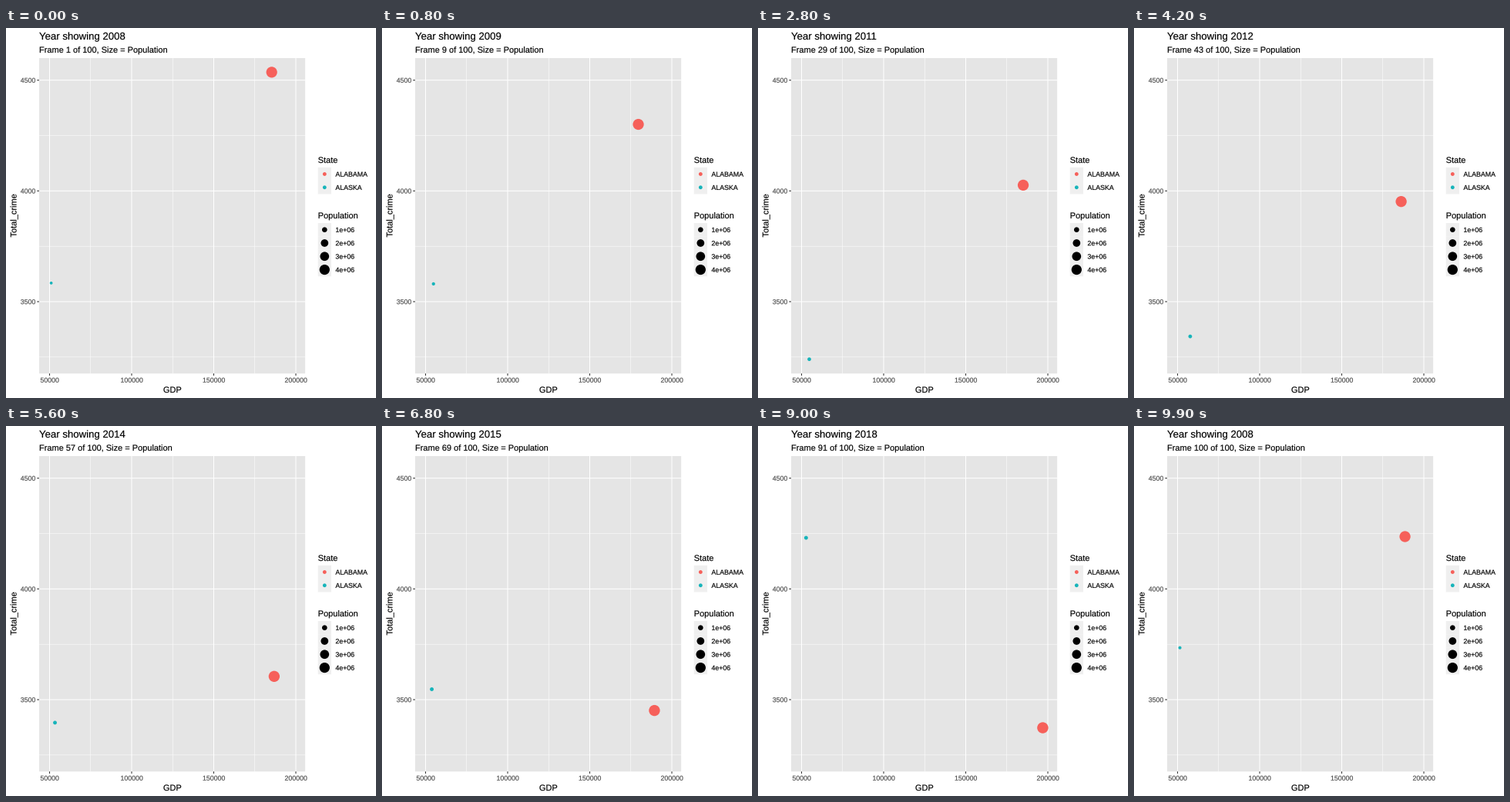
Recreate the animation shown at these times as a matplotlib script. Size 480 by 480 pixels, loop 10000 ms.

```python
import numpy as np
import matplotlib.pyplot as plt
from matplotlib.animation import FuncAnimation
from matplotlib.patches import Circle, PathPatch, Rectangle
from matplotlib.path import Path
from matplotlib.textpath import TextPath

STAGE, DPI = 480, 80
FRAMES, INTERVAL = 100, 100
RED, TEAL, GREY = "#F6605A", "#17B4BA", "#4D4D4D"
LEFT, RIGHT, TOP, BOTTOM = 43, 388.1, 39, 448.2
FIRST_YEAR, YEARS, HOLD = 2008, 11, 5
POP_MIN, POP_MAX = 0.687, 4.888

# One stop per year: GDP in thousands, crime rate
ALABAMA = [(185.3, 4536), (177.7, 4222), (182.6, 3894), (185.0, 4026),
           (186.2, 3952), (188.0, 3782), (186.8, 3605), (189.4, 3451),
           (190.8, 3480), (193.0, 3481), (198.2, 3337)]
ALASKA = [(51.0, 3584), (56.1, 3579), (54.3, 3491), (54.7, 3240),
          (57.7, 3343), (54.7, 3525), (53.3, 3396), (53.8, 3547),
          (52.9, 4157), (52.9, 4368), (52.7, 4185)]


def alabama_pop(k):
    return 4.718 + 0.017 * k


def alaska_pop(k):
    return POP_MIN + 0.055 * (1 - np.exp(-k / 3))


def px(gdp):
    return 56.5 + (gdp - 50) * 2.13


def py(crime):
    return 355 - (crime - 3500) * 0.2873


def point_size(pop):
    return 1 + 5 * np.sqrt((pop - POP_MIN) / (POP_MAX - POP_MIN))


def radius(size):
    return 0.375 * (2.845 * size + 0.945) + 0.45


def stops(points, pop):
    """Position and radius of a state's dot for every year."""
    return np.array([(px(g), py(c), radius(point_size(pop(k))))
                     for k, (g, c) in enumerate(points)])


def start(k):
    """Each year holds, then moves on over 4 frames (the second over 5)."""
    return 9 * k + (k >= 2)


def phase(i):
    """Current year, following year and the fraction between them."""
    k = max(j for j in range(YEARS) if start(j) <= i)
    leave, arrive = start(k) + HOLD, start(k + 1)
    return k, (k + 1) % YEARS, max(0, (i - leave) / (arrive - leave))


fig = plt.figure(figsize=(STAGE / DPI, STAGE / DPI), dpi=DPI, facecolor="white")
ax = fig.add_axes([0, 0, 1, 1])
ax.set_xlim(0, STAGE)
ax.set_ylim(STAGE, 0)
ax.axis("off")


def text_path(x, y, text, size, align=0, turned=False):
    """Unhinted outline; align 0, 0.5 or 1 places the left, middle or right."""
    path = TextPath((0, 0), text, size=size, prop={"family": "Liberation Sans"})
    u, v = path.vertices.T
    u = u - align * u.max()
    across, down = (-v, -u) if turned else (u, -v)
    if turned:
        across, down = -v, -u
    return Path(np.column_stack([x + across, y + down]), path.codes)


def label(x, y, text, size=8.8, color="black", **kw):
    return ax.add_patch(PathPatch(text_path(x, y, text, size, **kw), snap=False,
                                  facecolor=color, edgecolor=color, lw=0.15))


def line(x, y, color, width):
    ax.plot(x, y, color=color, lw=width * 72 / DPI, solid_capstyle="butt", snap=False)


def box(x, y, w, h, color):
    ax.add_patch(Rectangle((x, y), w, h, facecolor=color, lw=0, snap=False))


def dot(x, y, r, color):
    return ax.add_patch(Circle((x, y), r, facecolor=color, lw=0, zorder=5))


def grid(gdps, crimes, width):
    for g in gdps:
        line([px(g)] * 2, [TOP, BOTTOM], "white", width)
    for c in crimes:
        line([LEFT, RIGHT], [py(c)] * 2, "white", width)


def draw_panel():
    box(LEFT, TOP, RIGHT - LEFT, BOTTOM - TOP, "#E5E5E5")
    gdps, crimes = range(50, 201, 50), range(3500, 4501, 500)
    grid(range(75, 176, 50), range(3250, 4251, 500), 0.53)
    grid(gdps, crimes, 1.07)
    for g in gdps:
        line([px(g)] * 2, [BOTTOM, BOTTOM + 2.75], "#333333", 1.07)
        label(px(g), 459.8, f"{g}000", color=GREY, align=0.5)
    for c in crimes:
        line([LEFT - 2.75, LEFT], [py(c)] * 2, "#333333", 1.07)
        label(LEFT - 5, py(c) + 3.2, str(c), color=GREY, align=1)
    label((LEFT + RIGHT) / 2, 473, "GDP", 11, align=0.5)
    label(13.5, (TOP + BOTTOM) / 2, "Total_crime", 11, align=0.5, turned=True)


def draw_legend(title, title_y, first_y, items):
    label(404.7, title_y, title, 11)
    key = 17.28
    for n, (text, color, size) in enumerate(items):
        y = first_y + n * key
        box(404.7, y - key / 2, key, key, "#EFEFEF")
        dot(413.3, y, radius(size), color)
        label(427.4, y + 3.2, text)


draw_panel()
draw_legend("State", 175, 189.5, [("ALABAMA", RED, 1.5), ("ALASKA", TEAL, 1.5)])
draw_legend("Population", 247, 261.7,
            [(f"{n}e+06", "black", point_size(n)) for n in range(1, 5)])

title = label(LEFT, 15, "Year", 13.2)
subtitle = label(LEFT, 32, "Frame", 11)
states = [(stops(ALABAMA, alabama_pop), dot(0, 0, 1, RED)),
          (stops(ALASKA, alaska_pop), dot(0, 0, 1, TEAL))]


def update(i):
    a, b, f = phase(i)
    year = FIRST_YEAR + (b if f > 0.5 else a)
    title.set_path(text_path(LEFT, 15, f"Year showing {year}", 13.2))
    subtitle.set_path(text_path(
        LEFT, 32, f"Frame {i + 1} of {FRAMES}, Size = Population", 11))
    for path, mark in states:
        x, y, r = path[a] + (path[b] - path[a]) * f
        mark.center = x, y
        mark.set_radius(r)
    return [title, subtitle] + [mark for _, mark in states]


anim = FuncAnimation(fig, update, frames=FRAMES, interval=INTERVAL,
                     repeat=True, repeat_delay=0, blit=False)
plt.show()
```
